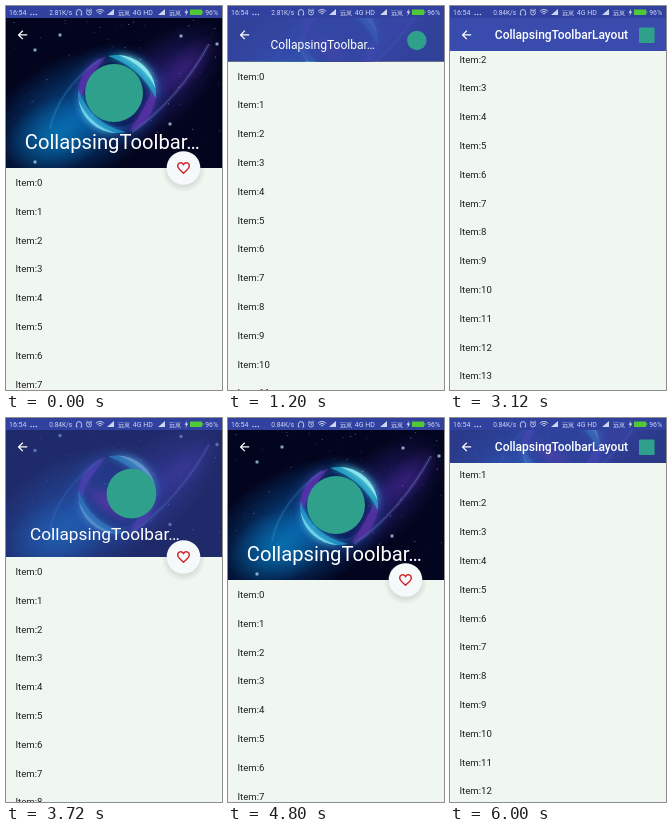
Recreate the animation shown at these times as an HTML page with a canvas. Size 216 px wide and 384 px high, loop 6.12 s.

```html
<!DOCTYPE html>
<html lang="en">
<head>
<meta charset="utf-8">
<title>Collapsing toolbar</title>
<style>
html, body { margin: 0; width: 100%; height: 100%; overflow: hidden; background: #f0f7f0; }
canvas { display: block; width: 216px; height: 384px; }
</style>
</head>
<body>
<canvas id="stage"></canvas>
<script>
const W = 216, HEIGHT = 384, LOOP = 6120, STEP = 120;
const EXPANDED = 162, COLLAPSED = 45;
const canvas = document.getElementById('stage');
const ctx = canvas.getContext('2d');
const dpr = window.devicePixelRatio || 1;
canvas.width = W * dpr;
canvas.height = HEIGHT * dpr;

// Top edge of the list over time; below COLLAPSED only the list scrolls.
const scrollKeys = [
  [0, 162], [120, 156], [480, 106.5], [660, 78], [1200, 55.5], [1500, 44],
  [2280, -49], [2640, -72], [2900, -55], [3400, 45], [3540, 79], [3720, 139],
  [4080, 157], [4440, 162], [5040, 162], [5280, 137], [5520, 77], [5700, 42], [6000, 12.7]
];

const clamp = (v, lo = 0, hi = 1) => Math.min(hi, Math.max(lo, v));
const mix = (a, b, k) => a + (b - a) * k;

// Cubic interpolation that never overshoots its keys.
function scrollAt(t) {
  const slope = i => {
    const a = scrollKeys[i], b = scrollKeys[i + 1];
    return a && b ? (b[1] - a[1]) / (b[0] - a[0]) : 0;
  };
  const tangent = i => {
    const p = slope(i - 1), q = slope(i);
    return p * q > 0 ? 2 * p * q / (p + q) : 0;
  };
  let i = 0;
  while (i < scrollKeys.length - 2 && scrollKeys[i + 1][0] <= t) i++;
  const [t0, y0] = scrollKeys[i], [t1, y1] = scrollKeys[i + 1];
  const d = t1 - t0, k = clamp((t - t0) / d);
  return mix(y0, y1, k * k * (3 - 2 * k))
    + d * k * (1 - k) * ((1 - k) * tangent(i) - k * tangent(i + 1));
}

// Collapsed state as 0..1, animated after each threshold crossing.
function collapseState(t, duration) {
  const rise = start => Math.pow(clamp((t - start) / duration), 1.35);
  if (t < 3540) return rise(660);
  if (t < 5520) return Math.pow(1 - clamp((t - 3540) / duration), 1.8);
  return rise(5520);
}

function label(text, x, y, size, color, { weight = 400, family = 'Roboto, sans-serif' } = {}) {
  ctx.font = `${weight} ${size}px ${family}`;
  ctx.fillStyle = color;
  ctx.fillText(text, x, y);
}

function stroke(color, width, path) {
  ctx.strokeStyle = color;
  ctx.lineWidth = width;
  ctx.beginPath();
  path();
  ctx.stroke();
}

function polygon(color, points) {
  ctx.fillStyle = color;
  ctx.beginPath();
  points.forEach(([x, y]) => ctx.lineTo(x, y));
  ctx.fill();
}

function disc(x, y, r, color) {
  ctx.fillStyle = color;
  ctx.beginPath();
  ctx.arc(x, y, r, 0, Math.PI * 2);
  ctx.fill();
}

function glow(x, y, rx, ry, turn, rgb, alpha) {
  ctx.save();
  ctx.translate(x, y);
  ctx.rotate(turn);
  ctx.scale(rx, ry);
  const g = ctx.createRadialGradient(0, 0, 0, 0, 0, 1);
  g.addColorStop(0, `rgba(${rgb},${alpha})`);
  g.addColorStop(0.5, `rgba(${rgb},${alpha * 0.5})`);
  g.addColorStop(1, `rgba(${rgb},0)`);
  disc(0, 0, 1, g);
  ctx.restore();
}

// Tapered piece of the luminous ring, thickest at angle mid.
function crescent(mid, half, width, rgb, alpha) {
  const R = 39, control = 2 * (R - width) - R * Math.cos(half);
  ctx.save();
  ctx.translate(111, 88);
  ctx.rotate(mid);
  ctx.shadowColor = `rgb(${rgb})`;
  ctx.shadowBlur = 7 * dpr;
  ctx.fillStyle = `rgba(${rgb},${alpha})`;
  ctx.beginPath();
  ctx.arc(0, 0, R, -half, half);
  ctx.quadraticCurveTo(control, 0, R * Math.cos(half), -R * Math.sin(half));
  ctx.fill();
  ctx.restore();
}

function drawSpace() {
  ctx.fillStyle = '#03051f';
  ctx.fillRect(0, 0, W, 200);
  glow(70, 112, 100, 62, -0.5, '8,88,165', 0.95);
  glow(52, 128, 55, 36, -0.4, '6,125,190', 0.75);
  glow(150, 80, 85, 42, -0.75, '50,38,140', 0.75);
  glow(178, 62, 42, 18, -0.8, '76,40,150', 0.55);
  glow(111, 88, 54, 52, 0, '28,105,195', 0.65);

  disc(111, 88, 33, 'rgba(10,22,80,0.65)');
  glow(101, 96, 30, 13, 0.65, '135,30,165', 0.8);
  crescent(0.5, 0.75, 9, '88,48,165', 0.75);
  crescent(-2.6, 0.75, 8, '92,50,175', 0.75);
  crescent(2.3, 0.95, 8, '32,150,200', 0.8);
  crescent(-0.85, 0.95, 10, '35,165,200', 0.85);
  crescent(-0.85, 0.7, 4, '150,235,240', 0.85);
  crescent(2.3, 0.7, 3, '130,225,240', 0.75);

  [[4, 0.12], [0.9, 0.5]].forEach(([width, alpha]) => {
    stroke(`rgba(130,140,235,${alpha})`, width, () => {
      ctx.moveTo(126, 126);
      ctx.quadraticCurveTo(172, 94, 203, 38);
    });
    stroke(`rgba(70,160,225,${alpha * 0.7})`, width, () => {
      ctx.moveTo(44, 123);
      ctx.quadraticCurveTo(52, 84, 94, 53);
    });
  });

  let seed = 23;
  const random = () => (seed = seed * 16807 % 2147483647) / 2147483647;
  for (let i = 0; i < 70; i++)
    disc(random() * W, 14 + 120 * random() ** 1.6, 0.2 + random() * 0.45,
      `rgba(165,205,245,${0.2 + random() * 0.55})`);
  [[29, 44], [54, 29], [175, 30], [211, 38], [29, 156], [164, 118]].forEach(([x, y]) => {
    glow(x, y, 2.4, 2.4, 0, '190,230,255', 1);
  });
}

function drawHeader(bottom, scrim) {
  ctx.save();
  ctx.beginPath();
  ctx.rect(0, 0, W, bottom);
  ctx.clip();
  ctx.save();
  ctx.translate(0, (bottom - EXPANDED) / 2);
  drawSpace();
  ctx.restore();
  ctx.fillStyle = `rgba(57,76,174,${scrim})`;
  ctx.fillRect(0, 0, W, bottom);
  ctx.restore();
}

function drawList(top) {
  for (let i = 0; i < 30; i++) {
    const y = top + 18 + i * 28.8;
    if (y > 30 && y < HEIGHT + 12) label(`Item:${i}`, 9.5, y, 9.6, '#1c1f22');
  }
}

function drawAvatar(e) {
  const x = mix(108, 196.8, e), y = mix(87, 29.3, e), r = mix(29, 7.8, e);
  const color = '#2fa08b';
  if (e < 1) return disc(x, y, r, color);
  ctx.fillStyle = color;
  ctx.beginPath();
  ctx.roundRect(x - r, y - r, r * 2, r * 2, 1.2);
  ctx.fill();
}

function drawTitle(e) {
  const x = mix(18.8, 44.8, e), y = mix(143.3, 33.3, e);
  const size = mix(20.2, 12, 1 - (1 - e) ** 2);
  if (e < 1) label('CollapsingToolbar…', x, y, size, '#fff');
  else label('CollapsingToolbarLayout', x, y, size, '#fff', { weight: 500 });
}

function drawBackArrow() {
  stroke('#fff', 1.25, () => {
    ctx.moveTo(21.2, 28.9);
    ctx.lineTo(12.8, 28.9);
    ctx.moveTo(16.8, 24.7);
    ctx.lineTo(12.6, 28.9);
    ctx.lineTo(16.8, 33.1);
  });
}

function drawFab(y, scale) {
  if (scale <= 0) return;
  ctx.save();
  ctx.translate(177.5, y);
  ctx.scale(scale, scale);
  ctx.globalAlpha = scale;
  glow(0, 2.5, 22, 22, 0, '40,45,55', 0.4);
  disc(0, 0, 16.8, '#f6f9fa');
  stroke('#cf2027', 1.4, () => {
    ctx.moveTo(0, 5.3);
    ctx.bezierCurveTo(-3.8, 2, -5.8, 0.2, -5.8, -2);
    ctx.bezierCurveTo(-5.8, -5.5, -1.8, -6.3, 0, -3.5);
    ctx.bezierCurveTo(1.8, -6.3, 5.8, -5.5, 5.8, -2);
    ctx.bezierCurveTo(5.8, 0.2, 3.8, 2, 0, 5.3);
    ctx.closePath();
  });
  ctx.restore();
}

function drawStatusBar(t) {
  const ink = '#ced5f0';
  const text = (s, x, size = 7) => label(s, x, 9, size, ink);
  const carrier = x => label('远岚', x, 8.8, 6, ink, { family: '"Noto Sans CJK SC", "Noto Sans CJK", sans-serif' });
  const signal = x => polygon(ink, [[x, 9], [x + 7, 9], [x + 7, 3]]);
  ctx.fillStyle = '#3141a0';
  ctx.fillRect(0, 0, W, 12);
  text('16:54', 3);
  [25, 27.7, 30.4].forEach(x => disc(x, 8.4, 0.75, ink));
  text(t < 3000 ? '2.81K/s' : '0.84K/s', 43.3, 6.5);

  stroke(ink, 0.9, () => {
    ctx.arc(73, 6.2, 2.6, Math.PI, 0);
    ctx.lineTo(75.6, 9);
    ctx.lineTo(74.5, 9);
    ctx.moveTo(70.4, 6.2);
    ctx.lineTo(70.4, 9);
    ctx.lineTo(71.5, 9);
  });
  stroke(ink, 0.8, () => {
    ctx.arc(83, 6.5, 2.5, 0, Math.PI * 2);
    ctx.moveTo(83, 4.9);
    ctx.lineTo(83, 6.7);
    ctx.lineTo(84.2, 6.7);
    ctx.moveTo(80, 4.2);
    ctx.lineTo(81.5, 3);
    ctx.moveTo(84.5, 3);
    ctx.lineTo(86, 4.2);
  });
  [1.5, 3.5, 5.5].forEach(r => stroke(ink, 1, () => ctx.arc(94, 9, r, -2.4, -0.75)));
  signal(101);
  carrier(112);
  text('4G HD', 126.8);
  signal(152);
  carrier(163);
  polygon(ink, [[181, 2.8], [178.5, 6.7], [180.2, 6.7], [179.4, 10], [182.3, 5.6], [180.5, 5.6]]);
  ctx.fillStyle = '#51c936';
  ctx.fillRect(184, 3.5, 12, 5.5);
  ctx.fillRect(196.3, 5, 1, 2.5);
  text('96%', 199.3, 6.8);
}

function draw(t) {
  const top = scrollAt(t);
  const bottom = clamp(top, COLLAPSED, EXPANDED);
  const e = (EXPANDED - bottom) / (EXPANDED - COLLAPSED);
  ctx.setTransform(dpr, 0, 0, dpr, 0, 0);
  ctx.fillStyle = '#f0f7f0';
  ctx.fillRect(0, 0, W, HEIGHT);
  drawList(top);
  drawHeader(bottom, collapseState(t, 600));
  drawTitle(e);
  drawAvatar(e);
  drawBackArrow();
  drawFab(bottom, 1 - collapseState(t, 180));
  drawStatusBar(t);
}

const start = performance.now();
function tick() {
  const t = (performance.now() - start) % LOOP;
  draw(Math.floor(t / STEP) * STEP);
  requestAnimationFrame(tick);
}
tick();
</script>
</body>
</html>
```
